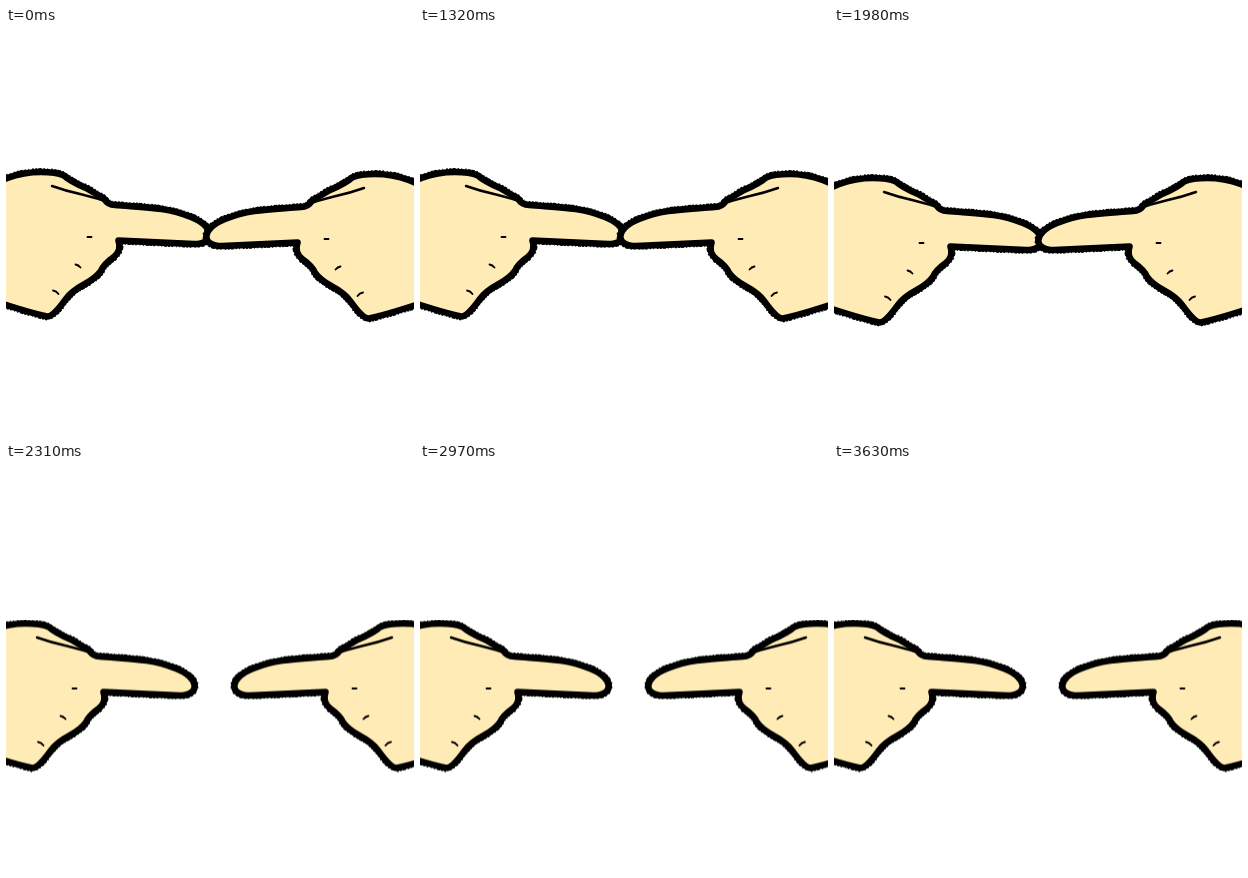
Write an HTML page that moves like this. It is 408 px wide and 408 px high and loops after 3960 ms.

```html
<!DOCTYPE html>
<html lang="en">
<head>
<meta charset="utf-8">
<title>Pointing hands</title>
<style>
  html, body { margin: 0; width: 100%; height: 100%; overflow: hidden; background: #fff; }
  svg { display: block; width: 100vw; height: 100vh; }
  path { fill: none; stroke: #000; stroke-linecap: round; stroke-linejoin: round; }
  .skin { fill: #feebb5; stroke-width: 6.6; }
  .rough { stroke-width: 7.8; stroke-dasharray: 1.3 2.2 .8 3.1 1.7; stroke-linecap: butt; }
  .crease { stroke-width: 2.4; }
  .knuckles { stroke-width: 1.8; }
</style>
</head>
<body>
<svg viewBox="0 0 408 408">
  <defs>
    <!-- back of the hand, finger, fist -->
    <path id="outline" style="fill:inherit;stroke-width:inherit;stroke-dasharray:inherit;stroke-linecap:inherit"
      d="M-30 168 Q0 144 35 144 Q50 144 58 147.500 Q64 153 80 160 L98 170.500
         Q102 177 109 177 C140 179.500 160 179 185 189 C210 199 209 216 188 216 Q150 214.500 112.500 212.500
         Q116 222 108 229 Q98 236 95 243 Q90 250 79 256 Q66 263 60 271 Q47 289 41 288.500 Q20 284 -30 267"/>
    <g id="hand">
      <use href="#outline" class="rough"/>
      <use href="#outline" class="skin"/>
      <path class="crease" d="M46 158 Q60 163 76 166.500 T108 176.500"/>
      <path class="knuckles" d="M81.500 209 h4 M69.500 236.500 q3 .5 5 3 M47 262.500 q3.500 .5 5.500 3.500"/>
    </g>
  </defs>
  <use id="left" href="#hand"/>
  <use id="right" href="#hand"/>
</svg>
<script>
  const STEP = 330;
  const MIRROR = 404;

  // How far the hands sink at each step; every second step they are pulled apart
  const drops = [0, 0, 6, 0, 0, 5, 6, 15.5, 6, 15.5, 6, 15.5];

  function pose(drop, step) {
    const apart = step % 2;
    const gap = apart ? 21.5 : 0;
    const drift = apart ? 4.5 + drop / 8 : drop * 2 / 3;
    const tilt = Math.max(0, 2 - drop / 3);
    return {
      left: `translate(${drift - gap}px, ${drop}px)`,
      right: `translate(${MIRROR + drift + gap}px, ${drop + tilt}px) scale(-1, 1)`
    };
  }

  const poses = drops.map(pose);
  for (const side of ['left', 'right']) {
    const frames = [...poses, poses[0]].map((p, i) => ({
      transform: p[side],
      offset: i / poses.length,
      easing: 'step-end'
    }));
    document.getElementById(side).animate(frames, {
      duration: STEP * poses.length,
      iterations: Infinity
    });
  }
</script>
</body>
</html>
```
